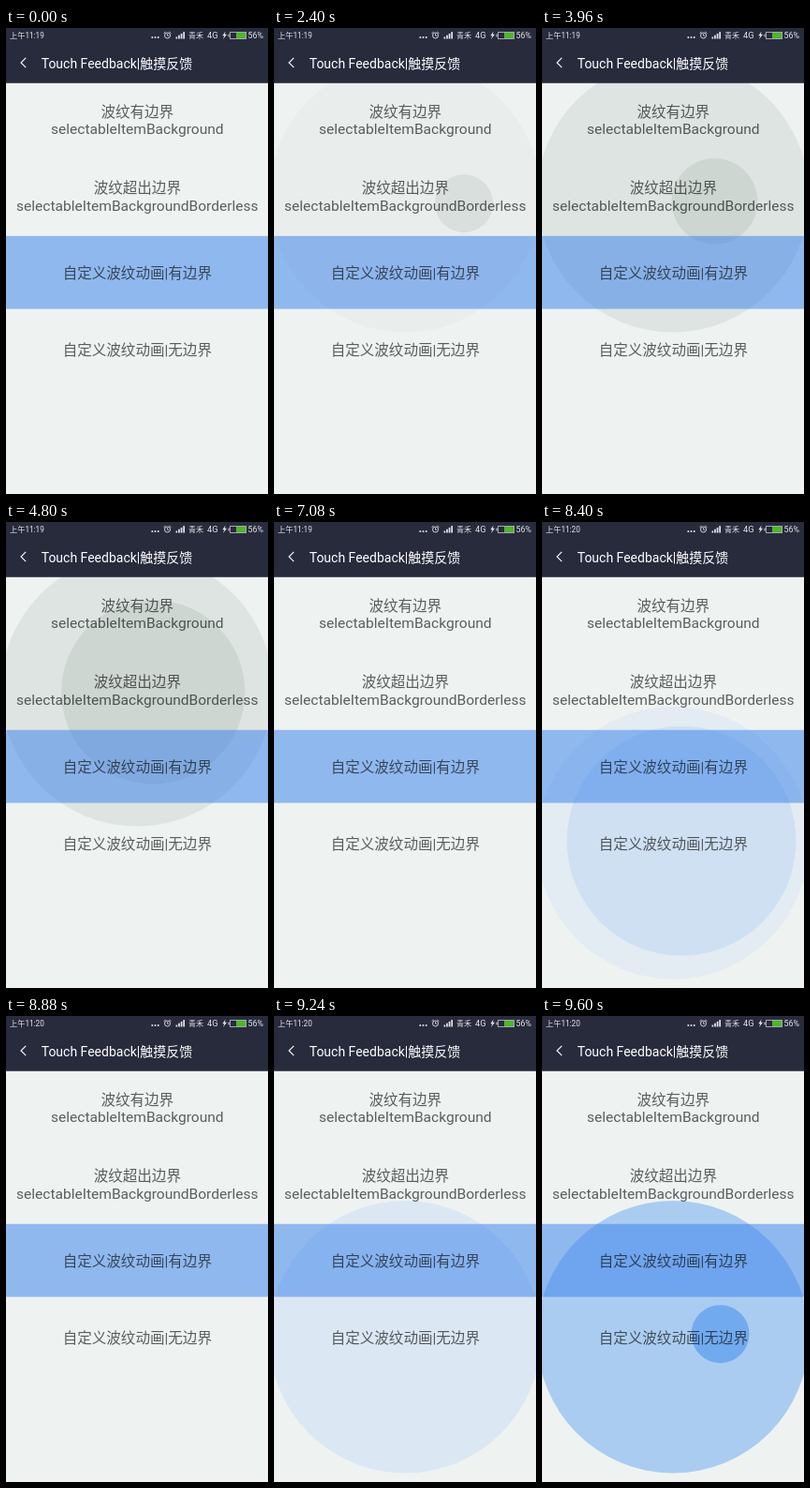
Animation of 280 by 497 pixels, one loop 9.72 s. Source, as an HTML page with a canvas:

```html
<!DOCTYPE html>
<html lang="zh-CN">
<head>
<meta charset="utf-8">
<title>Touch feedback</title>
<style>
html, body { margin: 0; width: 100%; height: 100%; overflow: hidden; background: #eef3f2; }
canvas { display: block; width: 280px; height: 497px; }
</style>
</head>
<body>
<canvas id="stage"></canvas>
<script>
const W = 280, H = 497, LOOP = 9720, STEP = 120;
const BAR_H = 58.8, ROW_H = 77.8, ROW_STEP = 81.5;
const ROW_R = Math.hypot(W / 2, ROW_H / 2), TOUCH_R = 31;
const DELAY = 140, FADE = 480;
const FONT = 'Roboto, "Noto Sans CJK SC", "Noto Sans CJK", sans-serif';
const GREY = '10,30,0', BLUE = '64,140,239';
const canvas = document.getElementById('stage');
const c = canvas.getContext('2d');
const dpr = window.devicePixelRatio || 1;
canvas.width = W * dpr;
canvas.height = H * dpr;

const rows = [
  ['波纹有边界', 'selectableItemBackground'],
  ['波纹超出边界', 'selectableItemBackgroundBorderless'],
  ['自定义波纹动画|有边界'],
  ['自定义波纹动画|无边界']
];

// glow: alpha of the whole disc; alpha: of the ripple, which waits for hold and grows over span
const presses = [
  { row: 0, down: 100, up: 840, x: 200, span: 565, rgb: GREY, glow: .05, alpha: .06 },
  { row: 1, down: 2260, up: 4920, x: 203, dy: 8, hold: 1320, span: 1840, rgb: GREY, glow: .07, alpha: .07 },
  { row: 2, down: 6100, up: 6360, x: 175, span: 820, rgb: BLUE, glow: .05, alpha: .2 },
  { row: 3, down: 7540, up: 8400, x: 212, dy: -17, span: 900, rgb: BLUE, glow: .065, alpha: .12 },
  { row: 3, down: 9105, up: LOOP, x: 190.5, dy: -3, hold: LOOP, span: 900, rgb: BLUE, glow: .385, alpha: .53 }
];

const ramp = (t, start, span) => Math.min(1, Math.max(0, (t - start) / span));
const mix = (a, b, p) => a + (b - a) * p;
const rowTop = i => BAR_H + i * ROW_STEP;
const isBounded = p => p.row % 2 === 0;

function disc(x, y, r, fill) {
  c.fillStyle = fill;
  c.beginPath();
  c.arc(x, y, r, 0, 7);
  c.fill();
}

function box(x, y, w, h, fill) {
  c.fillStyle = fill;
  c.fillRect(x, y, w, h);
}

function line(points, color, width) {
  c.strokeStyle = color;
  c.lineWidth = width;
  c.beginPath();
  points.forEach(p => c.lineTo(...p));
  c.stroke();
}

function text(s, x, y, size, color, align = 'left') {
  c.font = size + 'px ' + FONT;
  c.textAlign = align;
  c.fillStyle = color;
  c.fillText(s, x, y);
}

function drawPress(press, t) {
  const { row, down, up, x, dy = 0, hold = 0, span, rgb, glow, alpha } = press;
  if (t < down || t >= up + FADE) return;
  const top = rowTop(row), cy = top + ROW_H / 2;
  const touch = down + DELAY, left = 1 - ramp(t, up, FADE);
  c.save();
  if (isBounded(press)) {
    c.beginPath();
    c.rect(0, top, W, ROW_H);
    c.clip();
  }
  disc(W / 2, cy, ROW_R, `rgba(${rgb},${glow * left * ramp(t, down, FADE)})`);
  if (t >= touch) {
    const grow = ramp(t, touch + hold, span), drift = grow ** .6;
    disc(mix(x, W / 2, drift), cy + dy * (1 - drift),
      mix(TOUCH_R, ROW_R, grow), `rgba(${rgb},${alpha * left})`);
  }
  c.restore();
}

function drawRowText(lines, row) {
  const base = rowTop(row) + (lines.length > 1 ? 36 : 45.4);
  lines.forEach((s, i) =>
    text(s, W / 2 + .3, base + i * 18.3, 15.556, 'rgba(0,0,0,.62)', 'center'));
}

function drawStatus(t) {
  const ink = '#e4e6ea', green = '#4fb52c';
  text(t < 7680 ? '上午11:19' : '上午11:20', 4, 11.2, 8.2, ink);
  for (let i = 0; i < 3; i++) disc(156.3 + i * 3.2, 10, 1, ink);

  // alarm clock
  c.strokeStyle = ink;
  c.lineWidth = .9;
  c.beginPath();
  c.arc(172.5, 8, 3, 0, 7);
  c.stroke();
  line([[172.5, 6.2], [172.5, 8.2], [174, 8.2]], ink, .8);
  line([[168.6, 5.6], [170.6, 4]], ink, .9);
  line([[174.4, 4], [176.4, 5.6]], ink, .9);

  for (let i = 0; i < 4; i++) box(181.5 + i * 2.6, 9.5 - i * 1.8, 1.7, 2 + i * 1.8, ink);
  text('青禾', 195, 11.2, 8, ink);
  text('4G', 215, 11.3, 9.2, ink);

  // charging bolt and battery
  c.fillStyle = ink;
  c.beginPath();
  [[234.6, 3.5], [231.3, 8.3], [233.3, 8.3], [232, 12], [236, 6.8], [233.8, 6.8]]
    .forEach(p => c.lineTo(...p));
  c.fill();
  box(237.3, 6.5, 1.5, 3, '#a3a8ad');
  box(246, 5, 10, 6, green);
  c.strokeStyle = '#a3a8ad';
  c.lineWidth = 1;
  c.strokeRect(239.5, 4.5, 17, 7);
  text('56%', 258.5, 11.3, 8.9, ink);
}

function draw(t) {
  c.setTransform(dpr, 0, 0, dpr, 0, 0);
  box(0, 0, W, H, '#eef3f2');
  presses.filter(p => !isBounded(p)).forEach(p => drawPress(p, t));
  box(0, rowTop(2), W, ROW_H, 'rgba(59,131,236,.52)');
  presses.filter(isBounded).forEach(p => drawPress(p, t));
  rows.forEach(drawRowText);

  box(0, 0, W, BAR_H, '#272b3c');
  drawStatus(t);
  line([[21.2, 31.8], [16, 37], [21.2, 42.2]], '#fff', 1.1);
  text('Touch Feedback|触摸反馈', 37.7, 42.5, 14, '#fff');
}

function tick(now) {
  draw(Math.floor((now % LOOP) / STEP) * STEP);
  requestAnimationFrame(tick);
}
requestAnimationFrame(tick);
</script>
</body>
</html>
```
